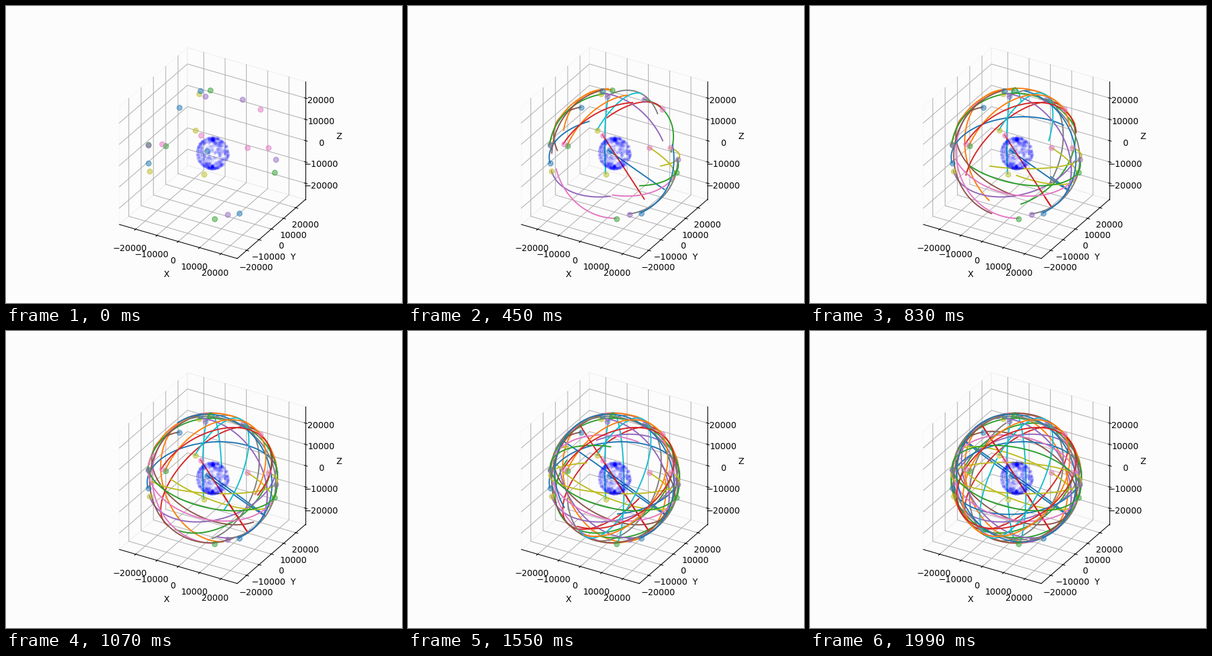
Recreate the animation shown at these times as a matplotlib script. Size 640 px wide and 480 px high, loop 2.01 s.

```python
import numpy as np
import matplotlib.pyplot as plt
from matplotlib.animation import FuncAnimation

W, H, DPI = 640, 480, 100
CENTER = np.array([333.0, 237.2])
RADIUS, EARTH = 26571, 6371
LIM = RADIUS * 25 / 24
PX = 220 / (2 * LIM)              # pixels per km
STEPS = 99                        # steps per revolution
TIP = 21                          # step of the second point in ORBITS

# Start point and the point TIP steps later, on screen, per satellite.
ORBITS = [
    (324, 233, 414, 296), (329, 135, 251, 200), (381, 150, 425, 235),
    (410, 166, 321, 180), (231, 266, 326, 307), (279, 163, 241, 233),
    (336, 343, 239, 263), (321, 145, 403, 173), (389, 228, 426, 284),
    (319, 271, 323, 147),
    (229, 253, 292, 186), (229, 223, 323, 133), (229, 224, 321, 141),
    (314, 208, 381, 311), (311, 141, 411, 217), (313, 136, 232, 237),
    (433, 268, 330, 305), (357, 336, 436, 247), (423, 228, 408, 258),
    (305, 200, 377, 141),
    (376, 334, 427, 224), (257, 225, 353, 145), (435, 247, 374, 290),
    (251, 222, 362, 156),
]


def project(x, y, z):
    """Orthographic view, elevation 30, azimuth -60, in pixels."""
    c, s = np.cos(np.pi / 6), 0.5
    right = c * x + s * y
    up = -s * s * x + s * c * y + c * z
    return CENTER[0] + PX * right, CENTER[1] - PX * up


def path(*points, **style):
    ax.plot(*project(*np.array(points, float).T), **style)


def orbit(x0, y0, x1, y1):
    """Projected circle through both points; its major axis is the radius."""
    a = 2 * np.pi * TIP / STEPS
    p = np.array([x0, y0]) - CENTER
    q = (np.array([x1, y1]) - CENTER - p * np.cos(a)) / np.sin(a)
    u, s, vt = np.linalg.svd(np.column_stack([p, q]))
    r = RADIUS * PX
    axes = u @ np.diag([r, min(s[1], r)]) @ vt
    t = 2 * np.pi * np.arange(STEPS) / STEPS
    return CENTER[:, None] + axes @ [np.cos(t), np.sin(t)]


fig = plt.figure(figsize=(W / DPI, H / DPI), dpi=DPI, facecolor="#fcfcfc")
ax = fig.add_axes([0, 0, 1, 1])
ax.set_xlim(-0.5, W - 0.5)
ax.set_ylim(H - 0.5, -0.5)
ax.axis("off")

# Pane outlines
L = LIM
panes = [
    ("0.95", [(-L, -L, -L), (-L, L, -L), (-L, L, L), (-L, -L, L), (-L, -L, -L)]),
    ("0.90", [(-L, L, -L), (L, L, -L), (L, L, L), (-L, L, L), (-L, L, -L)]),
    ("0.925", [(-L, -L, -L), (L, -L, -L), (L, L, -L), (-L, L, -L), (-L, -L, -L)]),
]
for shade, corners in panes:
    path(*corners, color=shade, alpha=0.5, lw=1, zorder=0)

# Grid, ticks and tick labels
grid = dict(color="#b0b0b0", lw=0.8, zorder=1)
axis = dict(color="black", lw=0.8, zorder=1.5)
text = dict(ha="center", va="center", family="DejaVu Sans", fontsize=10)
t_in, t_out = L / 60, L / 30
for i, v in enumerate(range(-20000, 20001, 10000)):
    path((v, -L, -L), (v, L, -L), (v, L, L), **grid)
    path((L, v, -L), (-L, v, -L), (-L, v, L), **grid)
    path((-L, -L, v), (-L, L, v), (L, L, v), **grid)
    path((v, -L + t_in, -L), (v, -L - t_out, -L), **axis)
    path((L - t_in, v, -L), (L + t_out, v, -L), **axis)
    path((L - t_in, L, v), (L + t_out, L, v), **axis)
    label = str(v).replace("-", "\u2212")
    k = i - 2
    ax.text(269 + 34.4 * k, 411.3 + 9.9 * k, label, **text)
    ax.text(444 + 19.9 * k, 388 - 17.2 * k, label, **text)
    ax.text(508.5, 221.3 - 34.4 * k, label, **text)

path((-L, -L, -L), (L, -L, -L), **axis)
path((L, -L, -L), (L, L, -L), **axis)
path((L, L, -L), (L, L, L), **axis)
for x, y, name in [(258.5, 433, "X"), (463, 405, "Y"), (537.5, 210.5, "Z")]:
    ax.text(x, y, name, **text)

# Satellites: growing tracks below, start markers on top
tracks = [orbit(*o) for o in ORBITS]
lines = []
for i, (x, y, *_) in enumerate(ORBITS):
    lines += ax.plot([], [], color=f"C{i % 10}", lw=1.5, zorder=2)
    ax.plot([x], [y], "o", color=f"C{2 * i % 10}", ms=6, alpha=0.5, zorder=4)

# Earth as a cloud of translucent dots, densest at the poles
rng = np.random.default_rng(4)
lon = rng.uniform(0, 2 * np.pi, 560)
lat = rng.uniform(-np.pi / 2, np.pi / 2, 560)
ax.plot(*project(EARTH * np.cos(lat) * np.cos(lon),
                 EARTH * np.cos(lat) * np.sin(lon),
                 EARTH * np.sin(lat)),
        "o", color="blue", ms=3.6, mew=0, alpha=0.1, zorder=3)


def update(n):
    step = max(0, (10 * n - 30) // 20)
    for line, track in zip(lines, tracks):
        line.set_data(track[:, :step + 1] if step else ([], []))
    return lines


anim = FuncAnimation(fig, update, frames=201, interval=10,
                     repeat=True, repeat_delay=0)
plt.show()
```
